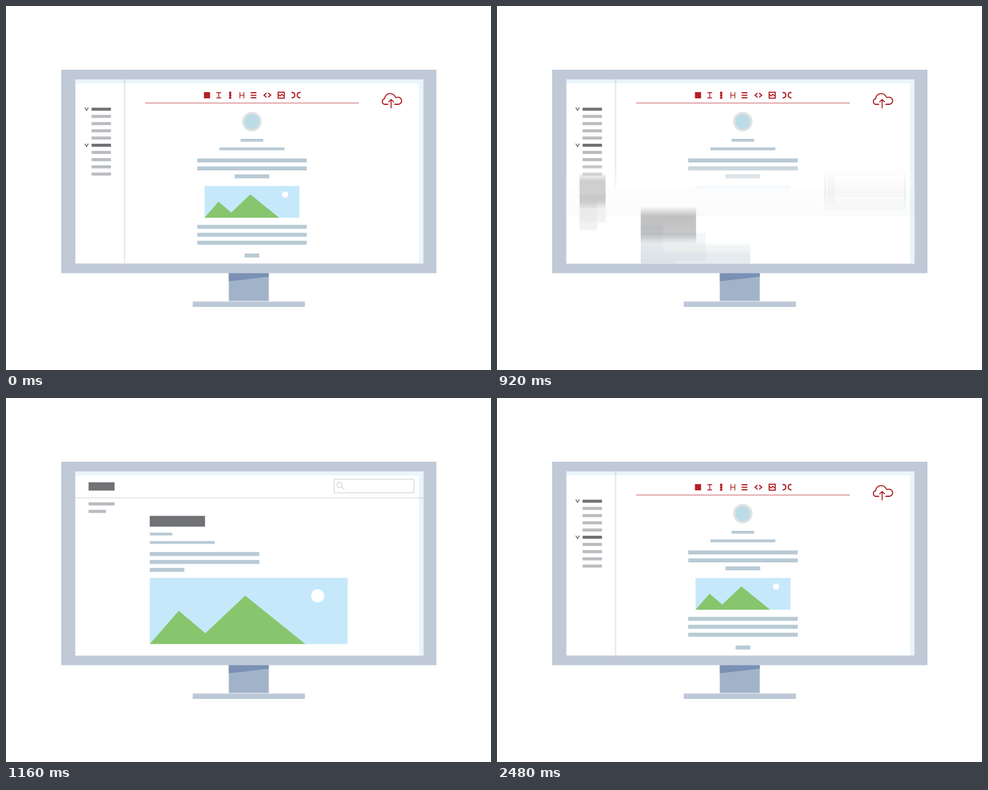
An HTML page with a canvas that plays this animation: 800 by 600 pixels, repeating every 3.64 s.

```html
<!DOCTYPE html>
<html lang="en">
<head>
<meta charset="utf-8">
<title>Editor to published page</title>
<style>
  html, body { margin: 0; width: 100%; height: 100%; overflow: hidden; background: #fff; }
  canvas { display: block; width: 800px; height: 600px; }
</style>
</head>
<body>
<canvas id="stage" width="800" height="600"></canvas>
<script>
const LOOP = 3640, STEP = 40, SHUTTER = 20, SAMPLES = 20;
const SCREEN = { x: 114.5, y: 121, w: 574, h: 303.5 };
const RED = '#b21e24', DARK = '#717275', GREY = '#b9bcc0', BAR = '#b8cad5';

const stage = document.getElementById('stage').getContext('2d');
const scratch = Object.assign(document.createElement('canvas'), { width: 800, height: 600 });
const g = scratch.getContext('2d');

// ---- drawing helpers (left, top, right, bottom) ----
function box(x0, y0, x1, y1, color) {
  g.fillStyle = color;
  g.fillRect(x0, y0, x1 - x0, y1 - y0);
}
function disc(x, y, r, color) {
  g.fillStyle = color;
  g.beginPath();
  g.arc(x, y, r, 0, Math.PI * 2);
  g.fill();
}
function shape(d, color) {
  g.fillStyle = color;
  g.fill(new Path2D(d));
}
function line(d, color, width) {
  g.strokeStyle = color;
  g.lineWidth = width;
  g.stroke(new Path2D(d));
}

// ---- timing ----
const smooth = u => u * u * (3 - 2 * u);

function bezier(x1, y1, x2, y2) {
  const at = (a, b, s) => 3 * (1 - s) * (1 - s) * s * a + 3 * (1 - s) * s * s * b + s * s * s;
  return x => {
    let lo = 0, hi = 1;
    for (let i = 0; i < 24; i++) {
      const mid = (lo + hi) / 2;
      if (at(x1, x2, mid) < x) lo = mid; else hi = mid;
    }
    return at(y1, y2, lo);
  };
}

function track(keys, t) {
  if (t <= keys[0][0]) return keys[0][1];
  for (let i = 1; i < keys.length; i++) {
    const [t0, v0] = keys[i - 1], [t1, v1] = keys[i];
    if (t < t1) return v0 + (v1 - v0) * smooth((t - t0) / (t1 - t0));
  }
  return keys[keys.length - 1][1];
}

const PULSE = [[160, 1], [370, 0.845], [590, 1.27], [830, 1]];
const ENTER = { from: 800, to: 1160, ease: bezier(0.45, 0, 0.2, 1) };
const EXIT = { from: 2372, to: 2478, ease: bezier(0.3, 0.22, 0.7, 0.9) };

// Vertical shift of the published page: up from below, then out over the top
function sheetShift(t) {
  const part = m => m.ease(Math.min(1, Math.max(0, (t - m.from) / (m.to - m.from))));
  if (t <= ENTER.from || t >= EXIT.to) return SCREEN.h;
  if (t < ENTER.to) return SCREEN.h * (1 - part(ENTER));
  return t <= EXIT.from ? 0 : -SCREEN.h * part(EXIT);
}

// ---- parts ----
function monitor() {
  box(0, 0, 800, 600, '#fff');
  box(91, 105, 710, 440.4, '#c0cad7');
  box(367.5, 440.4, 433.5, 488, '#a1b3c9');
  shape('M367.5 440.4H433.5V446.3L367.5 453.7Z', '#7a90b5');
  box(308, 486, 493, 487.5, '#e9ecec');
  box(308, 487.5, 493, 496, '#bcc8d7');
  box(SCREEN.x, SCREEN.y, SCREEN.x + SCREEN.w, SCREEN.y + SCREEN.h, '#fff');
}

function landscape(x, y, k) {
  g.save();
  g.translate(x, y);
  g.scale(k, k);
  box(0, 0, 156.5, 52.3, '#c6e8fb');
  shape('M0 52.3L23 26L44 43.8L75.5 14L123 52.3Z', '#87c66d');
  disc(132.8, 14.2, 5.2, '#fff');
  g.restore();
}

function toolbar() {
  box(326.5, 142, 336.6, 152.2, RED);
  line('M347 142.7H355M347 151.5H355M351 142.7V151.5', RED, 1.4);
  for (const y of [143.1, 147.1, 151.1]) disc(369.8, y, 2.1, RED);
  box(369.2, 143, 370.4, 151, RED);
  line('M385.8 142V152.2M392.4 142V152.2M385.8 147.1H392.4', RED, 1.3);
  line('M403.5 143H413M403.5 147.1H413M403.5 151.2H413', RED, 1.9);
  line('M429.8 143.4L425.6 147L429.8 150.6M432.4 143.4L436.6 147L432.4 150.6', RED, 1.9);
  line('M448.9 142.1H458.9V151.9H448.9Z', RED, 1.8);
  line('M449 145.2L452 148.4L455 145.6L459 149', RED, 1.6);
  line('M471 142.6Q476.4 142.6 476.4 147T471 151.4M485.8 142.6Q480.4 142.6 480.4 147T485.8 151.4', RED, 2);
  box(229.5, 159.4, 582, 160.5, '#c96367');
}

function cloud(scale) {
  g.save();
  g.translate(636, 156);
  g.scale(scale, scale);
  g.translate(-636, -156);
  g.lineCap = g.lineJoin = 'round';
  line('M629.7 162H624.5A4.7 4.7 0 0 1 624.4 152.8A9.3 9.3 0 0 1 642.5 150.7H645' +
       'A5.8 5.8 0 1 1 647 162H641.3', RED, 1.8);
  line('M635.3 167.8V154.2M631.4 157.9L635.3 154L639.2 157.9', RED, 1.7);
  g.restore();
}

function editor(t) {
  box(194, SCREEN.y, 197, 424.5, '#ebedef');
  for (let i = 0; i < 10; i++) {
    const y = 170.1 + 11.88 * i, head = i % 5 === 0;
    box(141.2, y - 2.5, 173.2, y + 2.5, head ? DARK : GREY);
    if (head) line(`M130 ${y - 2.7}L132.9 ${y + 2.2}L135.8 ${y - 2.7}`, '#5d5e61', 1.3);
  }
  toolbar();
  cloud(track(PULSE, t));
  disc(405.5, 190.6, 16, '#e0e1e3');
  disc(405.5, 190.6, 12.3, '#bbdbe7');
  box(387, 219, 424.3, 223.7, BAR);
  box(352, 233.2, 459.3, 237.8, BAR);
  for (const y of [251.3, 264.4, 360.7, 373.8, 386.9]) box(315.4, y, 496, y + 6.6, BAR);
  box(377, 277.5, 434.2, 284.1, BAR);
  landscape(327.5, 296.6, 1);
  box(393.5, 408, 417.8, 414.6, BAR);
}

function published() {
  box(SCREEN.x, SCREEN.y, SCREEN.x + SCREEN.w, SCREEN.y + SCREEN.h, '#fff');
  box(136.2, 139, 179.1, 152.6, DARK);
  line('M541.3 133.8H672.9V156.3H541.3Z', '#d5d6d8', 1.2);
  line('M554.6 143.3A4.3 4.3 0 1 1 546 143.3A4.3 4.3 0 1 1 554.6 143.3M553.5 146.4L558.2 151', '#d5d6d8', 1.4);
  box(SCREEN.x, 164.2, SCREEN.x + SCREEN.w, 165.3, '#d1d4d6');
  box(136.2, 172, 179.1, 177.2, GREY);
  box(136.2, 184.3, 165, 189.5, GREY);
  box(237.1, 194.3, 328.3, 212, DARK);
  box(237.1, 222, 274.3, 226.6, BAR);
  box(237.1, 235.8, 344.3, 240.4, BAR);
  box(237.1, 253.8, 417.8, 260.5, BAR);
  box(237.1, 266.9, 417.8, 273.5, BAR);
  box(237.1, 280, 294.2, 286.6, BAR);
  landscape(237.1, 296.5, 2.086);
}

function glare() {
  g.globalCompositeOperation = 'multiply';
  shape('M114.5 121H688.5V424.5H681.3V127.5H114.5Z', '#e9f4fb');
  g.globalCompositeOperation = 'source-over';
}

function scene(t, shift) {
  monitor();
  g.save();
  g.beginPath();
  g.rect(SCREEN.x, SCREEN.y, SCREEN.w, SCREEN.h);
  g.clip();
  editor(t);
  if (Math.abs(shift) < SCREEN.h) {
    g.translate(0, shift);
    published();
    g.translate(0, -shift);
  }
  glare();
  g.restore();
}

function render(t) {
  const moving = sheetShift(t) !== sheetShift(t + SHUTTER);
  const count = moving ? SAMPLES : 1;
  // Running average over the open shutter gives the motion blur
  for (let i = 0; i < count; i++) {
    scene(t, sheetShift(moving ? t + SHUTTER * (i + 0.5) / count : t));
    stage.globalAlpha = 1 / (i + 1);
    stage.drawImage(scratch, 0, 0);
  }
  stage.globalAlpha = 1;
}

const start = performance.now();
let shown = -1;
function tick() {
  const now = Math.max(0, performance.now() - start) % LOOP;
  const t = Math.floor(now / STEP) * STEP;
  if (t !== shown) render(shown = t);
  requestAnimationFrame(tick);
}
tick();
</script>
</body>
</html>
```
